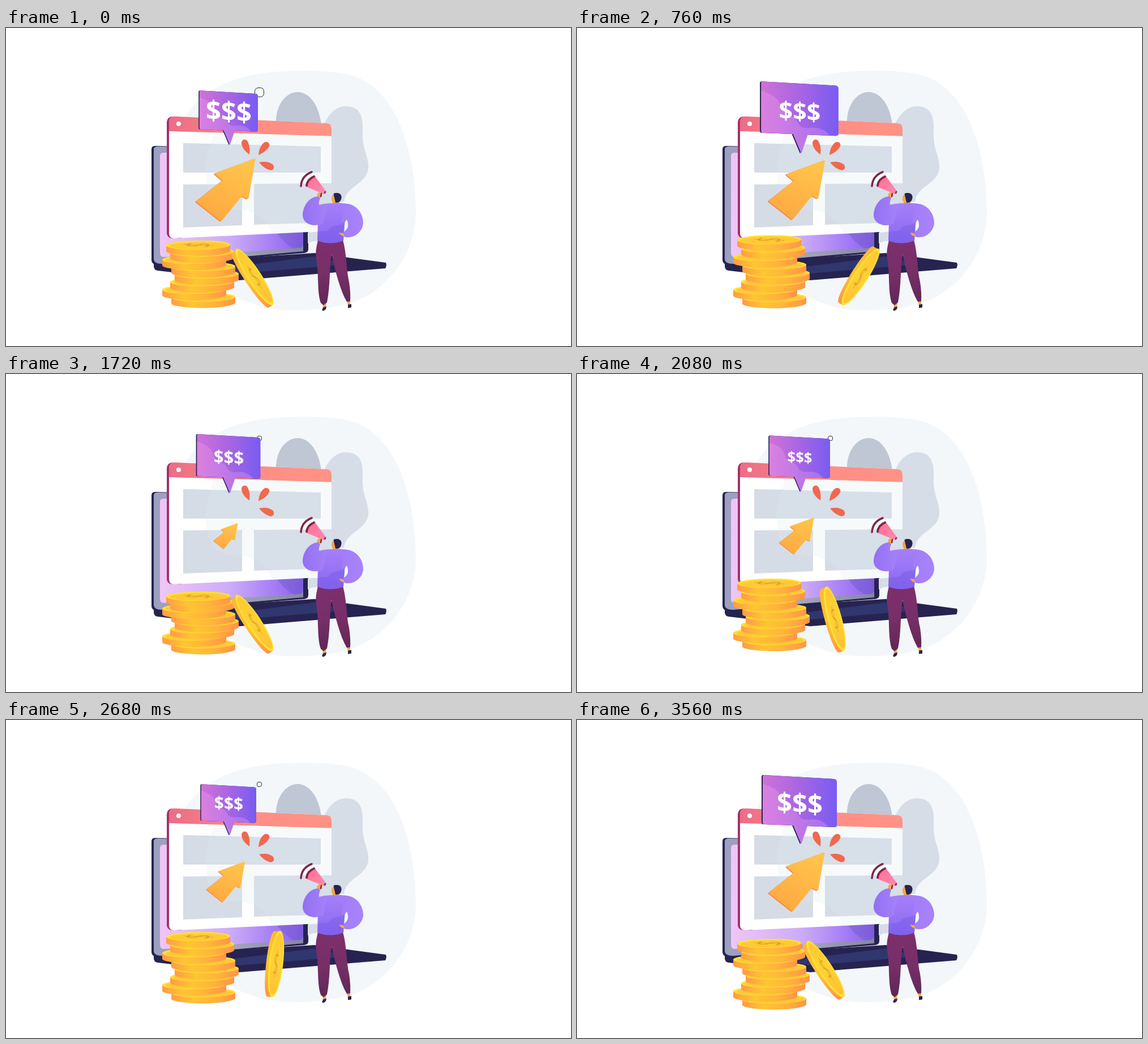
These frames come from a looping animation (998 px wide and 561 px high, 3600 ms). An HTML page with a canvas:

```html
<!DOCTYPE html>
<html lang="en">
<head>
<meta charset="utf-8">
<title>Online earnings</title>
<style>
  html, body { margin: 0; width: 100%; height: 100%; overflow: hidden; background: #fff; }
  canvas { display: block; }
</style>
</head>
<body>
<canvas id="stage" width="998" height="561"></canvas>
<script>
const ctx = document.getElementById('stage').getContext('2d');
const LOOP = 3600, STEP = 40;
const NAVY = '#262350', SKIN = '#f5a742';

// Poses as [time, value]; the motion eases between them.
const tracks = {
  coinTilt: [[0, 0], [200, 70], [400, 19], [560, 8], [800, 70], [1120, 22], [1400, 70], [1720, 0],
    [1900, 70], [2080, 18], [2400, 70], [2680, 40], [2840, 70], [3080, 0], [3370, 70], [3560, 0]],
  bubble: [[0, 104], [120, 113], [400, 86], [800, 139], [1120, 91], [1400, 126], [1600, 104], [1720, 113],
    [1880, 124], [2080, 108], [2400, 134], [2680, 98], [3000, 117], [3240, 88], [3560, 132]],
  dollars: [[0, 79], [400, 34], [760, 72], [1120, 31], [1420, 72], [1720, 52], [2080, 43],
    [2400, 74], [2680, 50], [3100, 34], [3560, 79]],
  arrow: [[0, 105], [400, 81], [760, 100], [1120, 78], [1720, 43], [2080, 61], [2400, 90],
    [2680, 68], [3100, 50], [3560, 99]],
  ring: [[0, 17], [240, 9], [3400, 9], [3560, 17]],
  baseLift: [[0, 17], [400, 23], [1120, 10], [1400, 5], [1680, 16], [2080, 22], [2680, 11], [2800, 0]],
  topLift: [[0, 11], [400, 28], [1120, 13], [1600, 1], [1720, 2], [2080, 25], [2680, 12], [3280, 0]]
};

function sample(track, t) {
  for (let i = 1; i < track.length; i++) {
    const [t0, v0] = track[i - 1], [t1, v1] = track[i];
    if (t <= t1) return v0 + (v1 - v0) * (1 - Math.cos(Math.PI * (t - t0) / (t1 - t0))) / 2;
  }
  return track[track.length - 1][1];
}

function gradient(x0, y0, x1, y1, ...colors) {
  const g = ctx.createLinearGradient(x0, y0, x1, y1);
  colors.forEach((c, i) => g.addColorStop(i / (colors.length - 1), c));
  return g;
}

function fill(path, style) {
  ctx.fillStyle = style;
  ctx.fill(new Path2D(path));
}

function stroke(path, style, width) {
  ctx.strokeStyle = style;
  ctx.lineWidth = width;
  ctx.lineCap = 'round';
  ctx.stroke(new Path2D(path));
}

function ellipse(x, y, rx, ry, style, angle = 0) {
  ctx.beginPath();
  ctx.ellipse(x, y, rx, ry, angle, 0, 2 * Math.PI);
  ctx.fillStyle = style;
  ctx.fill();
}

function at(x, y, draw) {
  ctx.save();
  ctx.translate(x, y);
  draw();
  ctx.restore();
}

function drawBackdrop() {
  fill('M300 190C320 130 370 97 430 84C480 73 560 73 600 81C690 98 724 220 724 325C724 400 670 470 600 488C540 502 470 502 430 484C380 470 300 400 300 190Z', '#f3f7fa');
  fill('M477 170C475 140 492 113 515 113C538 113 554 140 557 172Z', '#bfc6d4');
  fill('M555 190C563 155 582 138 600 138C622 138 631 152 630 178C628 215 640 222 640 245C640 275 600 278 597 306L575 310Z', '#d6dde7');
}

function drawLaptop() {
  fill('M261 415L545 397L671 414Q673 419 670 424L412 445L268 428Q261 427 261 420Z', NAVY);
  fill('M372 425L545 403L604 417L412 433Z', '#30366e');
  fill('M257 214Q257 208 263 208L534 215L534 390Q534 396 527 397L270 418Q257 418 257 409Z', NAVY);
  fill('M261 213Q262 209 268 209L525 215V394L276 416Q261 416 261 407Z', gradient(261, 0, 525, 0, '#9c9fc0', '#a5a7bb', '#8587a4'));
  const screen = 'M272 226Q272 220 278 220H525V380Q525 387 518 388L279 404Q272 404 272 396Z';
  fill(screen, gradient(272, 0, 525, 0, '#f0c6f6', '#cbabf8', '#8a5df2'));
  ctx.save();
  ctx.clip(new Path2D(screen));
  fill('M474 355C486 373 503 392 526 394V355Z', 'rgba(105,90,190,.42)');
  ctx.restore();
  fill('M533 361L552 359V376Q542 375 533 380Z', '#d6dde7');
}

function drawWindow() {
  fill('M284 166Q285 156 295 156L310 157V371H296Q284 371 284 361Z', '#a4306d');
  const panel = 'M288 165Q289 156 298 156L567 168Q575 169 575 177V358L297 371Q288 371 288 362Z';
  fill(panel, '#fff');
  ctx.save();
  ctx.clip(new Path2D(panel));
  fill('M285 150H580V191L285 182Z', gradient(288, 0, 575, 0, '#ec6c86', '#ff8d85', '#ff9385'));
  ellipse(305, 169, 4, 4, '#fff');
  fill('M313 203L556 209V255H313Z', '#d6dce6');
  fill('M313 276L417 275V348L313 352Z', '#d6dce6');
  fill('M438 275L575 274V343L438 347Z', '#d6dce6');
  fill('M367 184C363 210 350 225 353 258C355 300 372 320 402 320C440 320 460 335 471 365H580V191Z', 'rgba(218,230,238,.22)');
  ctx.restore();
}

function petal(x, y, angle) {
  at(x, y, () => {
    ctx.rotate(angle * Math.PI / 180);
    fill('M0 0C9 -6 18 -8 25 -5Q31 0 25 5C18 7 9 5 0 0Z', '#f0684f');
  });
}

function drawArrow(width) {
  at(388, 286, () => {
    const s = width / 105;
    ctx.scale(s, s);
    const path = 'M50 -54L-18 -29L-4 -17L-51 20L-9 53L27 9L38 14Z';
    ctx.lineJoin = 'round';
    for (const [dx, dy, color] of [[-1, 1, '#f58a48'], [1, 0, gradient(20, -50, -30, 45, '#ffc34a', '#ffaa42')]]) {
      at(dx, dy, () => {
        stroke(path, color, 3);
        fill(path, color);
      });
    }
  });
}

function drawRing(size) {
  const r = size / 2 - .5;
  ctx.beginPath();
  ctx.roundRect(447.5 - r, 113.5 - r, 2 * r, 2 * r, r * .75);
  ctx.fillStyle = 'rgba(255,255,255,.5)';
  ctx.fill();
  ctx.strokeStyle = '#222';
  ctx.lineWidth = 1;
  ctx.stroke();
}

function drawBubble(width, textWidth) {
  at(393, 160, () => {
    const s = width / 132;
    ctx.scale(s, s);
    const shape = 'M-62 -63L62 -56Q66 -55 66 -51V26Q66 29 62 29L14 27L3 59L-11 26L-62 24Q-65 24 -65 20V-60Q-65 -63 -62 -63Z';
    at(-2, 0, () => fill(shape, NAVY));
    fill(shape, gradient(-65, 0, 66, 0, '#cf72d8', '#a865e2', '#785cf2'));
    ctx.save();
    ctx.clip(new Path2D(shape));
    fill('M-66 -48C-50 -42 -36 -38 -31 -20C-27 -4 -12 -10 -4 5C5 24 20 10 38 18Q50 24 52 32L3 62L-66 30Z', 'rgba(247,165,245,.28)');
    ctx.restore();
  });
  at(393.5, 147, () => {
    ctx.transform(1, .06, 0, 1, 0, 0);
    const size = textWidth / 1.67;
    ctx.font = `bold ${size}px "Open Sans", sans-serif`;
    ctx.textAlign = 'center';
    ctx.fillStyle = '#fff';
    ctx.fillText('$$$', 0, size * .36);
  });
}

function coinMark(size, color) {
  ctx.font = `${size}px "Open Sans", sans-serif`;
  ctx.textAlign = 'center';
  ctx.fillStyle = color;
  ctx.fillText('$', 0, size * .36);
}

function drawStack(base, top) {
  const centers = [348.5, 332.5, 346.5, 354.5, 348.5, 332.5, 346.5, 339.5];
  centers.forEach((x, i) => {
    const s = i / 7;
    at(x, 492 - 14 * i - base - (top - base) * s * s, () => {
      fill('M-56.5 0V11C-56.5 15 -31 19 0 19S56.5 14 56.5 10V-1Z',
        gradient(-56, 0, 56, 0, '#ff9c46', '#ffc433', '#ffb43b', '#ff9448'));
      ellipse(0, 0, 56.5, 8, '#ffe22f', -.012);
      ellipse(1, .8, 52, 6.4, '#ffc935', -.012);
      if (i === 7) {
        ctx.scale(1, .19);
        ctx.rotate(-1.35);
        coinMark(66, '#dfa02e');
      }
    });
  });
}

function drawLooseCoin(tilt) {
  at(470, 487, () => {
    ctx.rotate((tilt - 33) * Math.PI / 180);
    ctx.translate(0, -57);
    fill('M-3 -58L-11 -57C-20 -50 -20 50 -9 59L-1 59Z', gradient(0, -58, 0, 58, '#ffb43b', '#ffc433', '#ff9448'));
    ellipse(0, 0, 12.5, 59, '#ffe22f');
    ellipse(.6, 0, 10, 54, gradient(0, -54, 0, 54, '#ffc735', '#ffd333', '#ffbf37'));
    ctx.scale(.26, 1);
    coinMark(58, '#e5a62c');
  });
}

function drawPerson() {
  // Megaphone and hand
  stroke('M521 279Q522 261 540 254', '#7d2748', 3.5);
  fill('M530 280Q534 267 546 262L566 289L562 293Z', gradient(535, 265, 562, 292, '#ff7197', '#ff89b0'));
  stroke('M531 278Q532 267 544 262', '#7d2748', 4);
  stroke('M563 291L564 289', '#a4306d', 3);
  ellipse(554, 295, 4.5, 5, SKIN);
  stroke('M557 292L556 297', '#7d2748', 2.5);
  // Head
  ellipse(579, 301, 4, 7, SKIN);
  fill('M577 303H589L588 314H577Z', SKIN);
  fill('M579 295Q577 291 583 291C591 290 594 296 592 302Q590 309 582 308Z', NAVY);
  // Shoes, ankles, trousers
  fill('M559 485H566L564 494H560ZM602 480H608L608 490H604Z', SKIN);
  fill('M560 493L566 491L565 496L561 499L558 498ZM604 488L610 487V493L604 494Z', NAVY);
  fill('M551 374Q572 382 595 374C602 398 601 428 606 448Q609 467 608 482L602 483C590 462 582 430 575 399C571 422 573 455 567 484L561 489L556 485C549 464 553 435 548 407C546 393 549 384 551 374Z',
    gradient(0, 376, 0, 488, '#7d2f6c', '#772f68', '#5f2755'));
  // Sweater
  fill('M552 312C569 308 590 308 602 310L598 348L596 375Q573 384 550 375L551 340Z', gradient(0, 310, 0, 378, '#a57ff9', '#8b69f1'));
  fill('M552 297C536 297 524 314 524 331C525 346 543 352 560 345L567 311L554 316Q551 307 555 301Z',
    gradient(525, 0, 565, 0, '#9271f3', '#a580f9'));
  fill('M595 310C618 308 631 327 631 344C630 362 611 373 597 368L594 361C605 356 606 347 602 338L593 350Z',
    gradient(595, 0, 631, 0, '#a37df9', '#a883fb'));
  fill('M551 360C562 355 565 362 572 354C578 345 588 352 598 341L596 375Q573 383 550 375Z', 'rgba(110,85,225,.35)');
  fill('M588 361L596 362L598 368L592 366Z', SKIN);
}

function render(t) {
  const pose = {};
  for (const name in tracks) pose[name] = sample(tracks[name], t);
  ctx.fillStyle = '#fff';
  ctx.fillRect(0, 0, 998, 561);
  drawBackdrop();
  drawLaptop();
  drawWindow();
  petal(430, 223, -112);
  petal(446, 224, -52);
  petal(447, 237, 22);
  drawArrow(pose.arrow);
  drawRing(pose.ring);
  drawBubble(pose.bubble, pose.dollars);
  drawStack(pose.baseLift, pose.topLift);
  drawLooseCoin(pose.coinTilt);
  drawPerson();
}

const start = performance.now();
function tick() {
  const elapsed = (performance.now() - start) % LOOP;
  render(Math.floor(elapsed / STEP) * STEP);
  requestAnimationFrame(tick);
}
tick();
</script>
</body>
</html>
```
